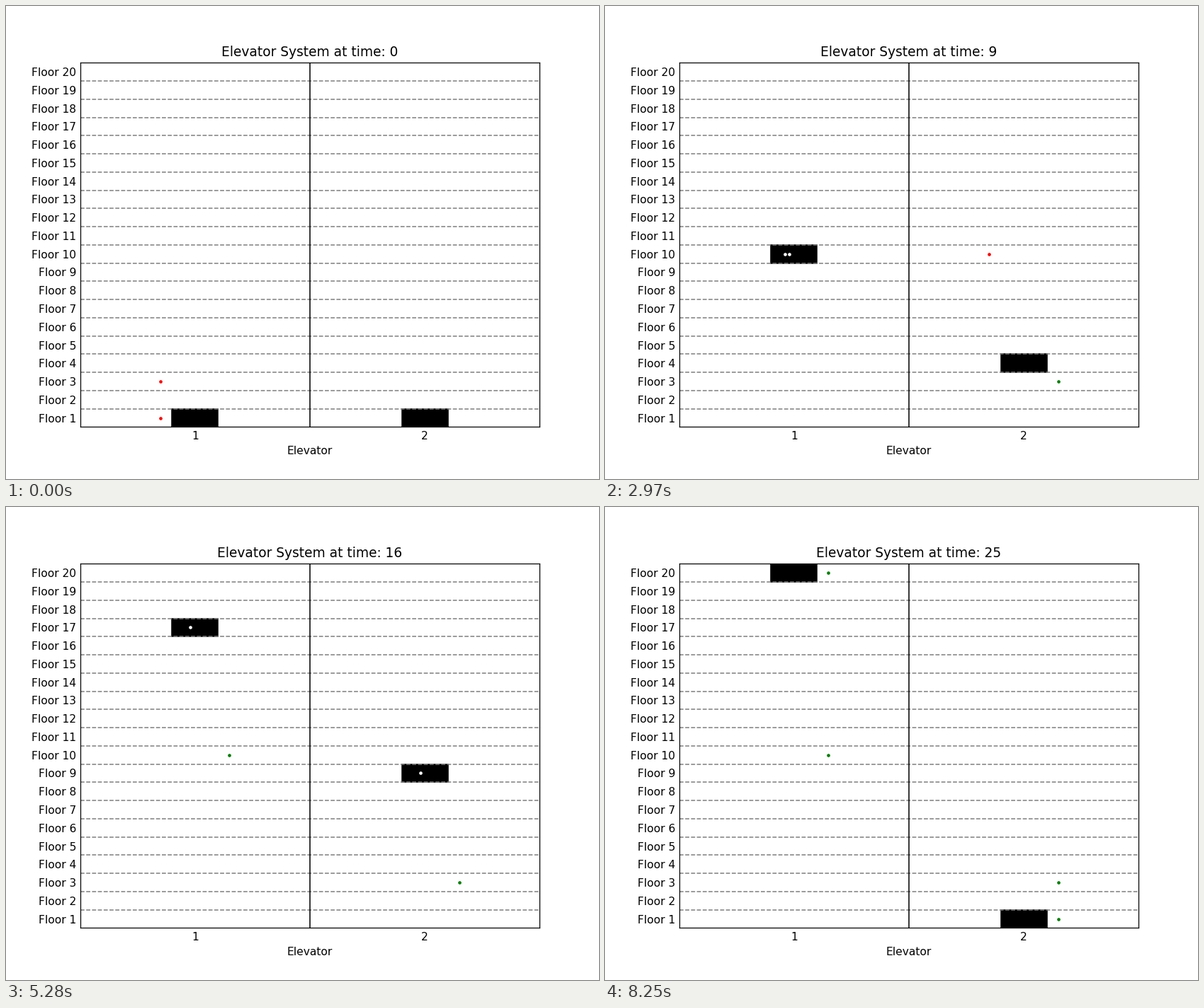
A matplotlib script that plays this animation: 837 px wide and 669 px high, repeating every 8580 ms.

```python
import numpy as np
import matplotlib.pyplot as plt
from matplotlib.animation import FuncAnimation
from matplotlib.patches import Rectangle

WIDTH, HEIGHT, DPI = 837, 669, 111.6
FLOORS, STEPS, STEP_MS = 20, 26, 330

plt.rcParams["font.family"] = "DejaVu Sans"

# Turning points of each car: times and floors
ROUTES = {
    1: ([0, 19, 25], [1, 20, 20]),
    2: ([0, 6, 15, 24, 25], [1, 1, 10, 1, 1]),
}

# car, place inside the car, call time, from floor, to floor
RIDERS = [
    (1, 0, 0, 1, 10),
    (1, 1, 0, 3, 20),
    (2, 0, 6, 1, 3),
    (2, 1, 5, 10, 1),
]


def car_floor(car, t):
    return int(round(np.interp(t, *ROUTES[car])))


def first_stop(car, floor, start):
    return next(t for t in range(start, STEPS) if car_floor(car, t) == floor)


def rider_state(rider, t):
    """Return x, floor and colour of a rider, or None before the call."""
    car, place, call, source, dest = rider
    board = first_stop(car, source, call)
    leave = first_stop(car, dest, board + 1)
    if t < call:
        return None
    if t <= board:
        return car - 0.15, source, "red"
    if t <= leave:
        return car - 0.04 + 0.02 * place, car_floor(car, t), "white"
    return car + 0.15, dest, "green"


fig, ax = plt.subplots(figsize=((WIDTH + 0.01) / DPI, (HEIGHT + 0.01) / DPI), dpi=DPI)
fig.subplots_adjust(left=0.125, right=0.9, bottom=0.11, top=0.88)
ax.set_xlim(0.5, 2.5)
ax.set_ylim(0, FLOORS)
ax.set_xticks([1, 2])
ax.set_yticks(np.arange(FLOORS) + 0.5, [f"Floor {n + 1}" for n in range(FLOORS)])
ax.tick_params(length=0)
ax.set_xlabel("Elevator")
title = ax.set_title("")

for y in range(1, FLOORS + 1):
    ax.axhline(y, color="gray", linestyle="--", linewidth=1)
for x in (0.5, 1.5):
    ax.axvline(x, color="black", linewidth=1)

cars = {car: ax.add_patch(Rectangle((car - 0.1, 0), 0.2, 1, color="black"))
        for car in ROUTES}
dots = [ax.plot([], [], "o", markersize=2)[0] for _ in RIDERS]


def draw(t):
    title.set_text(f"Elevator System at time: {t}")
    for car, box in cars.items():
        box.set_y(car_floor(car, t) - 1)
    for rider, dot in zip(RIDERS, dots):
        state = rider_state(rider, t)
        dot.set_visible(state is not None)
        if state:
            x, floor, color = state
            dot.set_data([x], [floor - 0.5])
            dot.set_color(color)
    return [title, *cars.values(), *dots]


anim = FuncAnimation(fig, draw, frames=STEPS, interval=STEP_MS, repeat=True,
                     repeat_delay=0, blit=False)
plt.show()
```
